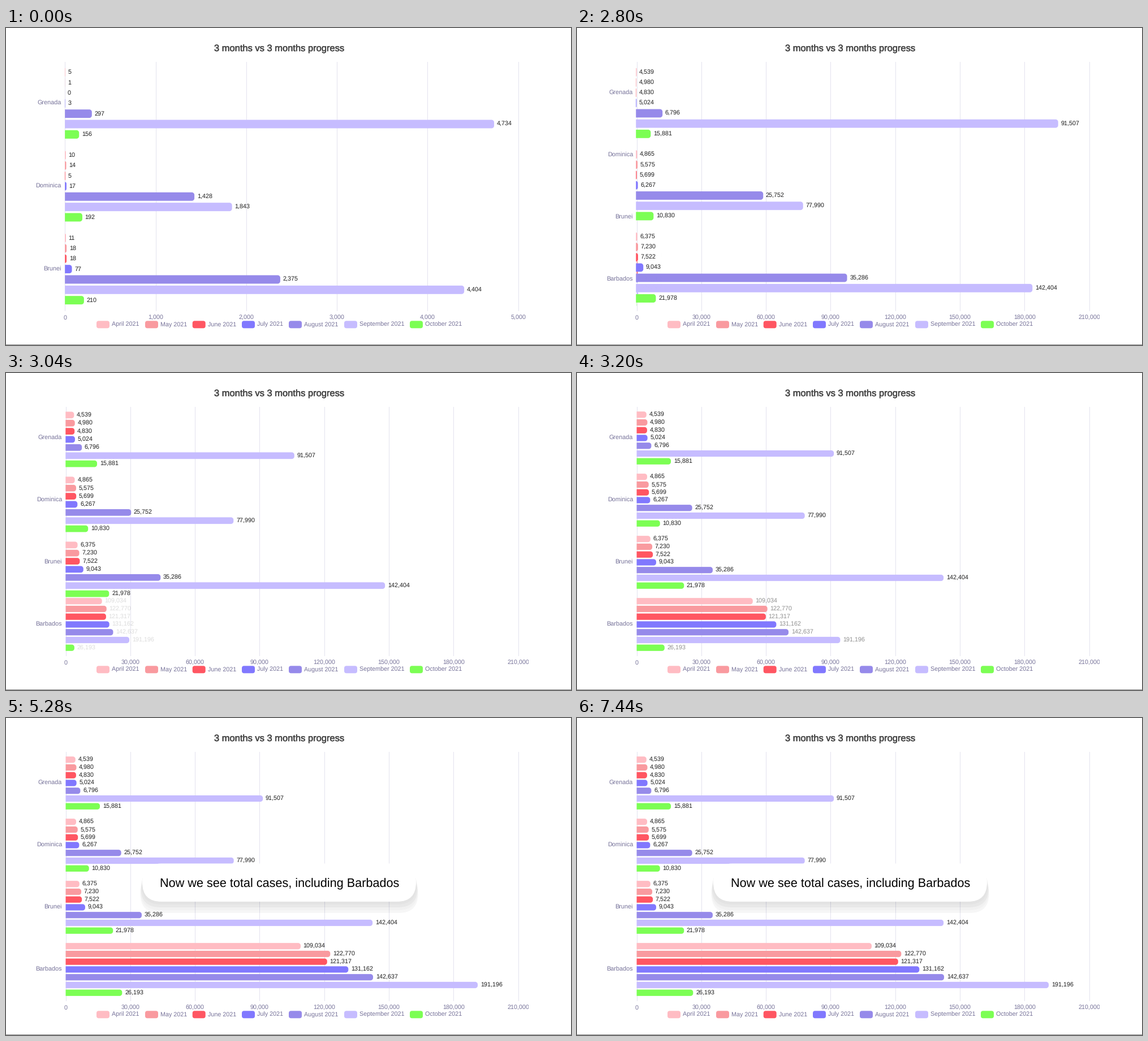
Recreate the animation shown at these times as a matplotlib script. Size 999 px wide and 561 px high, loop 7.52 s.

```python
import numpy as np
import matplotlib.pyplot as plt
from matplotlib import patheffects
from matplotlib.animation import FuncAnimation
from matplotlib.patches import FancyBboxPatch, PathPatch, Rectangle
from matplotlib.path import Path

W, H = 999, 561
STEP, FRAMES = 80, 94
TOP, BOTTOM, RIGHT = 60, 500, 905.7
UPDATE, SWITCH = 2702, 2800      # tween start, first visible change
CALLOUT = 4500

plt.rcParams["font.family"] = "Liberation Sans"
plt.rcParams["text.hinting"] = "none"

MONTHS = ["April", "May", "June", "July", "August", "September", "October"]
COLORS = ["#ffbcc3", "#f99a9f", "#ff5662", "#8178fe",
          "#968aea", "#c6bcff", "#7cfe54"]
LEGEND_X = [160, 246, 329.7, 417, 500, 598, 714]
MUTED, INK, GRID = "#77739a", "#1c1c1c", "#e3e2ee"

BEFORE = {
    "Grenada": [5, 1, 0, 3, 297, 4734, 156],
    "Dominica": [10, 14, 5, 17, 1428, 1843, 192],
    "Brunei": [11, 18, 18, 77, 2375, 4404, 210],
}
AFTER = {
    "Grenada": [4539, 4980, 4830, 5024, 6796, 91507, 15881],
    "Dominica": [4865, 5575, 5699, 6267, 25752, 77990, 10830],
    "Brunei": [6375, 7230, 7522, 9043, 35286, 142404, 21978],
    "Barbados": [109034, 122770, 121317, 131162, 142637, 191196, 26193],
}

fig = plt.figure(figsize=(W / 72, H / 72), dpi=72, facecolor="white")
ax = fig.add_axes([0, 0, 1, 1])
ax.set_xlim(0, W)
ax.set_ylim(H, 0)
ax.axis("off")


def write(x, y, s, size=10.75, color=INK, ha="left", z=5):
    return ax.text(x, y, s, size=size, color=color, ha=ha, va="baseline", zorder=z)


def rounded(x, y, w, h, r, color, z=1, alpha=1):
    return ax.add_patch(FancyBboxPatch(
        (x, y), w, h, boxstyle=f"round,pad=0,rounding_size={r}",
        fc=color, ec="none", lw=0, alpha=alpha, zorder=z))


def bar_path(x, y, w, h):
    """Bar with its right corners rounded."""
    r = min(4.5, w)
    k = r * 0.4477
    x1, y1 = x + w, y + h
    pts = [(x, y), (x1 - r, y), (x1 - k, y), (x1, y + k), (x1, y + r),
           (x1, y1 - r), (x1, y1 - k), (x1 - k, y1), (x1 - r, y1), (x, y1), (x, y)]
    codes = [Path.MOVETO, Path.LINETO] + [Path.CURVE4] * 3 + [Path.LINETO] \
        + [Path.CURVE4] * 3 + [Path.LINETO, Path.CLOSEPOLY]
    return Path(pts, codes)


def ease(t):
    t = np.clip(t, 0, 1)
    return 4 * t ** 3 if t < 0.5 else 1 - 4 * (1 - t) ** 3


class Layout:
    """Axis, grid and bar geometry for one data set."""

    def __init__(self, data, left, top_value, tick):
        self.data, self.left = data, left
        self.band = (BOTTOM - TOP) / len(data)
        self.scale = (RIGHT - left) / top_value
        self.artists = []
        edge = Rectangle((0, 0), 924, H, transform=ax.transData)
        for v in range(0, top_value + 1, tick):
            x = left + v * self.scale
            self.artists += ax.plot([x, x], [TOP, BOTTOM], color=GRID, lw=1, zorder=0)
            label = write(x, 516, f"{v:,}", color=MUTED, ha="center")
            label.set_clip_path(edge)
            label.set_clip_on(True)
            self.artists.append(label)
        for i, name in enumerate(data):
            y = TOP + (i + 0.5) * self.band + 3
            self.artists.append(write(left - 6.5, y, name, 10.9, MUTED, "right"))

    def bar(self, name, s):
        """Left, centre y, width and height of a bar."""
        row = list(self.data).index(name)
        cy = TOP + (row + 0.5) * self.band + (s - 3) * self.band / 8
        return np.array([self.left, cy, self.data[name][s] * self.scale,
                         self.band * 0.102])

    def show(self, on):
        for a in self.artists:
            a.set_visible(on)


old = Layout(BEFORE, 104.2, 5000, 1000)
new = Layout(AFTER, 105.5, 210000, 30000)

title = write(483, 41, "3 months vs 3 months progress", 16.5, "#464646", "center")
title.set_path_effects([patheffects.withStroke(linewidth=0.5, foreground="#464646")])
for month, color, x in zip(MONTHS, COLORS, LEGEND_X):
    rounded(x, 518.3, 23, 13, 4, color)
    write(x + 27, 528, f"{month} 2021", color=MUTED)
ax.add_patch(Rectangle((0, 560), W, 1, fc="#8a8a8a", ec="none", lw=0))

bars = {}
for s, color in enumerate(COLORS):
    for name in AFTER:
        patch = ax.add_patch(PathPatch(bar_path(0, 0, 1, 1), fc=color, ec="none",
                                       lw=0, zorder=2 + s / 10))
        bars[name, s] = patch, write(0, 0, "", z=4)

callout = []
for dy, grow, alpha in [(20, 3.5, 0.035), (15, 3, 0.02), (10, 2.5, 0.035), (5, 1, 0.02)]:
    box = rounded(241 - grow, 257.5 + dy, 484 + 2 * grow, 67.5, 33.7, "black", 7, alpha)
    callout.append((box, alpha))
callout.append((rounded(241, 257.5, 484, 67.5, 33.7, "white", 8), 1))
callout.append((write(483.2, 299, "Now we see total cases, including Barbados",
                      21.65, "black", "center", 9), 1))


def place(name, s, t):
    patch, label = bars[name, s]
    switched = t >= SWITCH
    fresh = name not in BEFORE
    patch.set_visible(switched or not fresh)
    label.set_visible(switched or not fresh)
    if fresh:
        p = ease((t - UPDATE) / 1000)
        x, cy, w, h = new.bar(name, s)
        w *= p
        label.set_alpha(p)
    else:
        p = ease((t - UPDATE) / 500) if switched else 0
        a, b = old.bar(name, s), new.bar(name, s)
        x, cy, w, h = a + (b - a) * p
    patch.set_path(bar_path(x, cy - h / 2, w, h))
    value = (AFTER if switched else BEFORE).get(name, AFTER[name])[s]
    label.set_text(f"{value:,}")
    label.set_position((x + w + 4.7, cy + 3))


def update(i):
    t = i * STEP
    old.show(t < SWITCH)
    new.show(t >= SWITCH)
    for name, s in bars:
        place(name, s, t)
    fade = np.clip((t - CALLOUT) / 500, 0, 1)
    for artist, alpha in callout:
        artist.set_visible(fade > 0)
        artist.set_alpha(alpha * fade)
    return []


anim = FuncAnimation(fig, update, frames=FRAMES, interval=STEP,
                     init_func=lambda: update(0), repeat=True, repeat_delay=0)
plt.show()
```
